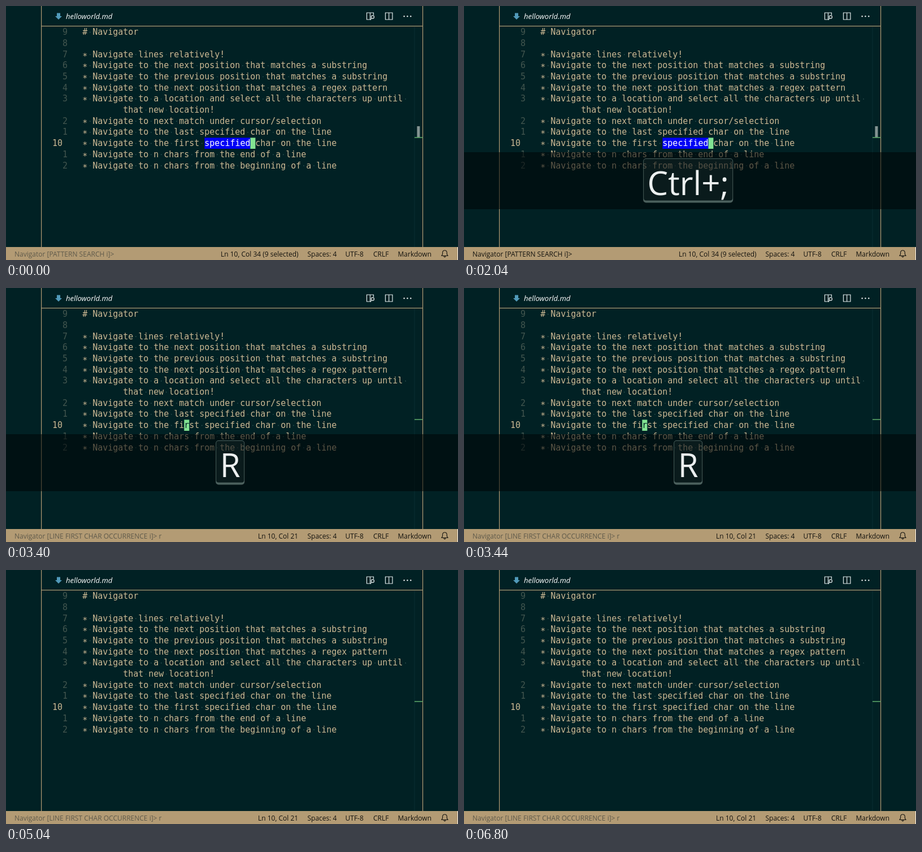
Recreate the animation shown at these times as an HTML page with a canvas. Size 800 px wide and 450 px high, loop 6.84 s.

```html
<!DOCTYPE html>
<html lang="en">
<head>
<meta charset="utf-8">
<title>Navigator</title>
<style>
html, body { margin: 0; width: 100%; height: 100%; overflow: hidden; background: #012124; }
canvas { display: block; width: 800px; height: 450px; }
</style>
</head>
<body>
<canvas id="stage" width="800" height="450"></canvas>
<script>
const ctx = document.getElementById('stage').getContext('2d');

const LOOP = 6840, STEP = 40, BLINK = 500;
const ACTIVATE = 1800, MODE = 2600, JUMP = 3260, HIDE_KEYS = 3940;

const UI = '"Open Sans", "Noto Sans", sans-serif';
const MONO = '14.96px "DejaVu Sans Mono", monospace';
const BG = '#012124', TAN = '#b39b74', CODE = '#cdb994', GREEN = '#82e392';
const LEFT = 135.2, CHAR = 9.007, ROW = 19.7, BASE = 51.15, CURRENT = 10;

const LINES = [
  ['9', '# Navigator'],
  ['8', ''],
  ['7', '∗ Navigate lines relatively!'],
  ['6', '∗ Navigate to the next position that matches a substring'],
  ['5', '∗ Navigate to the previous position that matches a substring'],
  ['4', '∗ Navigate to the next position that matches a regex pattern'],
  ['3', '∗ Navigate to a location and select all the characters up until '],
  ['', 'that new location!', 8],
  ['2', '∗ Navigate to next match under cursor/selection'],
  ['1', '∗ Navigate to the last specified char on the line'],
  ['10', '∗ Navigate to the first specified char on the line'],
  ['1', '∗ Navigate to n chars from the end of a line'],
  ['2', '∗ Navigate to n chars from the beginning of a line']
];

const KEYS = [
  { from: ACTIVATE, to: MODE, label: 'Ctrl+;', width: 159 },
  { from: MODE, to: JUMP, label: 'Ctrl+Shift+6', width: 333 },
  { from: JUMP, to: HIDE_KEYS, label: 'R', width: 51 }
];

const colX = col => LEFT + col * CHAR;
const rowY = row => BASE + row * ROW;

function rect(x, y, w, h, color) {
  ctx.fillStyle = color;
  ctx.fillRect(x, y, w, h);
}

function text(str, x, y, font, color, align = 'left') {
  ctx.font = font;
  ctx.textAlign = align;
  ctx.fillStyle = color;
  ctx.fillText(str, x, y);
}

function stroke(path, color, width) {
  ctx.strokeStyle = color;
  ctx.lineWidth = width;
  ctx.stroke(new Path2D(path));
}

function dot(x, y, r, color) {
  ctx.fillStyle = color;
  ctx.beginPath();
  ctx.arc(x, y, r, 0, 2 * Math.PI);
  ctx.fill();
}

function drawFrame() {
  rect(0, 0, 800, 450, BG);
  rect(62, 0, 1.2, 427, TAN);
  rect(737, 0, 1.2, 427, TAN);
  rect(62, 35, 676, 1.2, TAN);
  rect(722.5, 37, 1, 390, '#0b2f32');

  ctx.fillStyle = '#519aba';
  ctx.fill(new Path2D('M90 12.5H96V18H99L93 24L87 18H90Z'));
  text('helloworld.md', 106, 22.8, `italic 13px ${UI}`, '#ffffff');

  const white = '#e6ebeb';
  stroke('M644 24H638.5V12H650.5V16M644.5 12V24', white, 1.2);
  stroke('M651.5 19.5a2.6 2.6 0 1 1-5.2 0a2.6 2.6 0 1 1 5.2 0M647 21.5L644.8 25', white, 1.2);
  stroke('M671.5 12H684V24H671.5ZM677.7 12V24', white, 1.2);
  for (const x of [704.7, 710.5, 716.3]) dot(x, 18.3, 1.2, white);
}

function drawCode() {
  LINES.forEach(([number, line, indent = 0], row) => {
    const y = rowY(row), active = row === CURRENT;
    text(number, active ? 100 : 109, y, MONO, active ? CODE : '#43564f', 'right');
    text(line, colX(indent), y, MONO, CODE);
    [...line].forEach((c, i) => {
      if (c === ' ') dot(colX(indent + i + 0.5), y - 4.6, 0.95, '#294a4b');
    });
  });
}

function block(col, str, back, front) {
  rect(colX(col), 233.4, str.length * CHAR, 19.6, back);
  text(str, colX(col), rowY(CURRENT), MONO, front);
}

function drawCursor(t) {
  const jumped = t >= JUMP;
  if (!jumped) {
    block(24, 'specified', '#0000f5', '#ffffff');
    rect(727.5, 213, 5, 20, '#849492');
  }
  rect(723, 232.2, 14.5, 1.6, '#5aa568');

  const phase = Math.floor((jumped ? t - JUMP : t) / BLINK);
  if (phase % 2 === 0) block(jumped ? 20 : 33, jumped ? 'r' : ' ', GREEN, BG);
}

function drawStatus(t) {
  const font = `12px ${UI}`, ink = '#14130f', y = 444;
  const listening = t >= ACTIVATE && t < JUMP;
  const mode = t < MODE ? 'PATTERN SEARCH' : 'LINE FIRST CHAR OCCURRENCE';
  rect(0, 427, 800, 23, TAN);
  rect(799, 427, 1, 23, '#f6f2ea');
  text(`Navigator [${mode} i]>${t >= JUMP ? ' r' : ''}`, 15, y, font, listening ? ink : '#5f5a4b');

  if (t < JUMP) text('Ln 10, Col 34 (9 selected)', 380, y, font, ink);
  else text('Ln 10, Col 21', 446, y, font, ink);
  text('Spaces: 4', 533.5, y, font, ink);
  text('UTF-8', 600.5, y, font, ink);
  text('CRLF', 650, y, font, ink);
  text('Markdown', 693.5, y, font, ink);

  stroke('M771 442.5H782L780.4 439.8V437.5C780.4 434.8 778.7 433 776.5 433S772.6 434.8 772.6 437.5V439.8ZM775 443C775 445.5 778 445.5 778 443', ink, 1.1);
}

function drawKeys(t) {
  const key = KEYS.find(k => t >= k.from && t < k.to);
  if (!key) return;
  rect(0, 259, 800, 101, 'rgba(0,4,6,0.55)');

  const x = 396.7 - key.width / 2;
  ctx.beginPath();
  ctx.roundRect(x, 270, key.width, 78.5, 5);
  ctx.roundRect(x + 1, 271, key.width - 2, 73.5, 4);
  ctx.fillStyle = '#4b605d';
  ctx.fill('evenodd');
  ctx.beginPath();
  ctx.roundRect(x + 1, 271, key.width - 2, 73.5, 4);
  ctx.fillStyle = 'rgba(50,68,68,0.2)';
  ctx.fill();
  text(key.label, 396.7, 335, `58.2px ${UI}`, '#ecf0f0', 'center');
}

function draw(now) {
  const t = Math.floor((now % LOOP) / STEP) * STEP;
  drawFrame();
  drawCode();
  drawCursor(t);
  drawStatus(t);
  drawKeys(t);
}

const start = performance.now();
function tick() {
  draw(performance.now() - start);
  requestAnimationFrame(tick);
}
tick();
</script>
</body>
</html>
```
